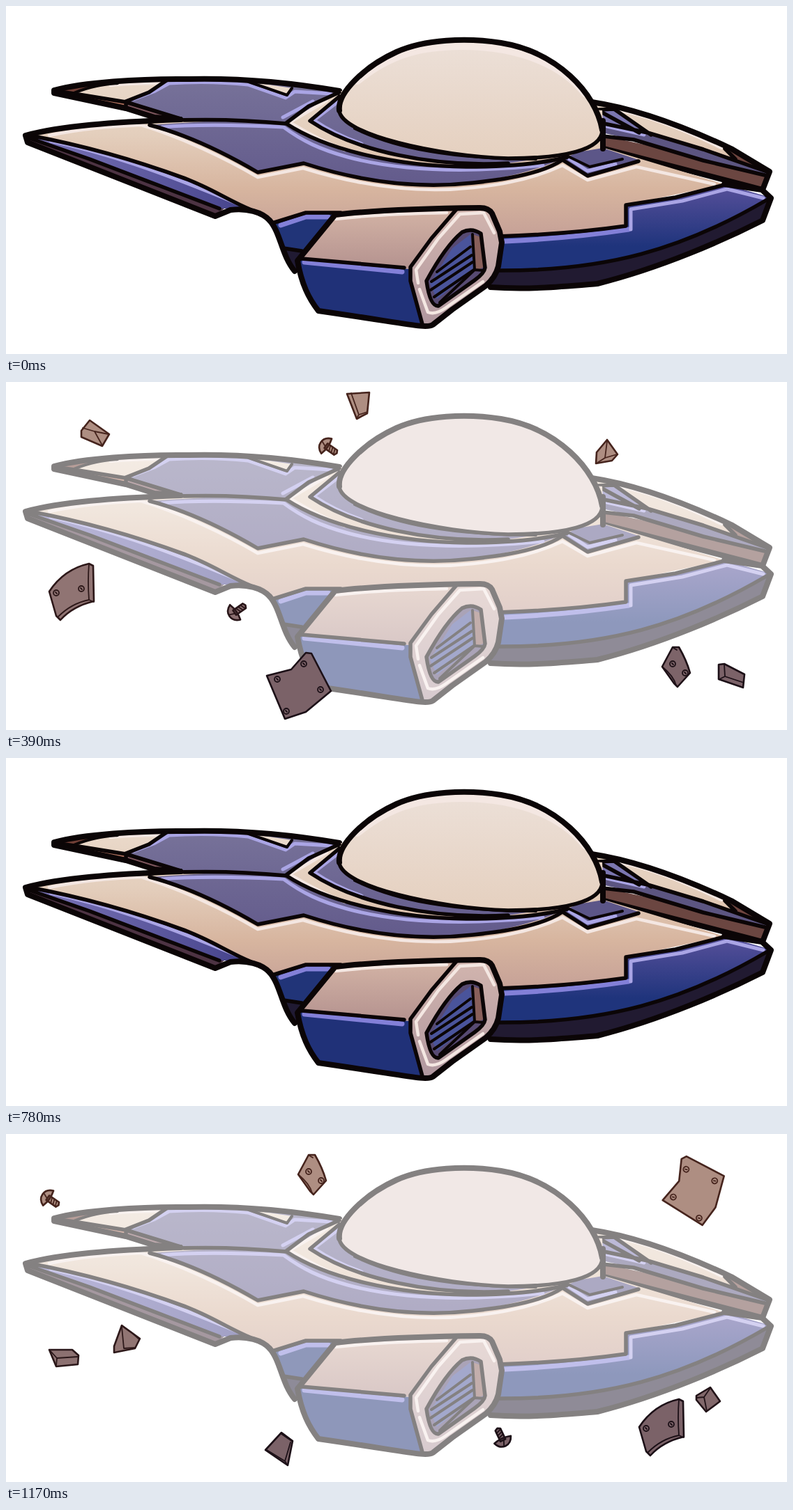
Recreate the animation shown at these times as an HTML page. Size 1120 by 500 pixels, loop 1.56 s.

```html
<!DOCTYPE html>
<html lang="en">
<head>
<meta charset="utf-8">
<title>Damaged spaceship</title>
<style>
html, body { margin: 0; width: 100%; height: 100%; overflow: hidden; background: #fff; }
svg { display: block; }
path { stroke-linejoin: round; stroke-linecap: round; }
.ink path { fill: none; stroke: #0b0506; stroke-width: 5.5; }
.ink .edge { stroke-width: 8; }
.ink .thin { stroke-width: 4; }
.shine path { fill: none; stroke: #f4e7e2; stroke-width: 4.5; }
.lilac path { fill: none; stroke: #aaa5e5; stroke-width: 5; }
.lilac .deep { stroke: #8380d8; stroke-width: 7; }
.hit #ship { opacity: .5; }
.hit #dome { fill: #e4d2ce; }
.hit #domeShine { display: none; }
</style>
</head>
<body>
<svg id="stage" width="1120" height="500" viewBox="0 0 1120 500">
  <defs>
    <linearGradient id="tan" gradientUnits="userSpaceOnUse" x1="0" y1="105" x2="0" y2="330">
      <stop offset="0" stop-color="#ead9ca"/><stop offset=".35" stop-color="#e4cfbd"/>
      <stop offset=".7" stop-color="#d7b59f"/><stop offset="1" stop-color="#c6a197"/>
    </linearGradient>
    <linearGradient id="purple" gradientUnits="userSpaceOnUse" x1="0" y1="105" x2="0" y2="255">
      <stop offset="0" stop-color="#777299"/><stop offset="1" stop-color="#635b8c"/>
    </linearGradient>
    <linearGradient id="blue" gradientUnits="userSpaceOnUse" x1="0" y1="258" x2="0" y2="345">
      <stop offset="0" stop-color="#57509a"/><stop offset="1" stop-color="#1f347c"/>
    </linearGradient>
    <linearGradient id="strip" gradientUnits="userSpaceOnUse" x1="60" y1="0" x2="340" y2="0">
      <stop offset="0" stop-color="#7771b4"/><stop offset="1" stop-color="#46448c"/>
    </linearGradient>
    <linearGradient id="glass" gradientUnits="userSpaceOnUse" x1="0" y1="50" x2="0" y2="220">
      <stop offset="0" stop-color="#ece0d8"/><stop offset="1" stop-color="#e5d0bf"/>
    </linearGradient>
    <linearGradient id="engine" gradientUnits="userSpaceOnUse" x1="0" y1="292" x2="0" y2="378">
      <stop offset="0" stop-color="#d3b3a5"/><stop offset="1" stop-color="#b4928f"/>
    </linearGradient>
    <linearGradient id="nozzle" gradientUnits="userSpaceOnUse" x1="0" y1="290" x2="0" y2="460">
      <stop offset="0" stop-color="#d2b5ae"/><stop offset="1" stop-color="#b0979f"/>
    </linearGradient>
  </defs>

  <g id="ship">
    <!-- far left wing -->
    <path fill="url(#purple)" d="M67 122C110 108 190 104 262 104C350 103 420 112 478 122L402 168L213 160L67 127Z"/>
    <path fill="#b3735f" d="M67 122L98 127L172 139V147L67 127Z"/>
    <path fill="#7d565d" d="M172 139L250 163L213 160L172 147Z"/>
    <path fill="url(#tan)" d="M97 125C140 111 180 109 230 108L205 124L172 137Z"/>
    <path fill="#713f36" d="M74 121C100 114 125 112 148 111L97 125Z"/>
    <path fill="#eadacb" d="M350 109L403 127L410 118Z"/>
    <g class="lilac">
      <path d="M183 134L212 123L234 111C280 108 320 110 347 113L401 132L414 123L466 126"/>
      <path d="M397 160L440 137"/>
    </g>
    <g class="shine"><path d="M150 114C180 111 200 111 219 111"/></g>
    <g class="ink">
      <path d="M70 122L98 126L172 138L250 162M172 137L205 124L230 107M172 138V145"/>
      <path class="thin" d="M348 109L403 128L410 118M97 125C125 114 140 113 160 111M97 126V131"/>
      <path class="edge" d="M478 122C420 112 350 103 262 105C190 104 110 110 69 121V125L172 147L213 160L250 163"/>
    </g>

    <!-- far right wing -->
    <path fill="url(#tan)" d="M838 138C900 144 970 170 1040 204L1095 238L1000 208L840 175Z"/>
    <path fill="#6b4641" d="M850 185L1095 238L1085 263L850 204Z"/>
    <path fill="#5c5581" d="M850 168L920 182L1000 205L1094 238L1088 243L1000 222L900 192L850 181Z"/>
    <path fill="#7b76b0" d="M845 148L872 148L922 184L850 168Z"/>
    <path fill="#70453f" d="M1034 206L1090 236L1046 222Z"/>
    <g class="shine"><path d="M874 149C920 157 975 179 1026 204"/></g>
    <g class="lilac"><path d="M862 173L915 185"/></g>
    <g class="ink">
      <path d="M850 149L872 148L925 185M853 152L908 182M853 168L920 182L1000 206L1094 239M1031 205L1046 220"/>
      <path d="M856 187L900 192L1000 222L1088 243"/>
      <path class="edge" d="M840 138C900 147 970 172 1040 205L1095 238L1085 264L858 205"/>
    </g>

    <!-- hull -->
    <path fill="url(#tan)" d="M28 186C80 172 140 167 200 166L300 164L402 168L478 122L855 150L858 204L1030 256L889 286V316C830 324 770 329 705 331L640 300L475 300L385 312L350 296C230 240 130 204 28 186Z"/>
    <path fill="#4d3343" d="M28 186L32 198L300 302L314 290L40 190Z"/>
    <path fill="url(#strip)" d="M40 187C120 203 190 224 260 250C300 265 320 280 350 291L305 291L36 190Z"/>
    <path fill="url(#purple)" d="M206 171L300 165L402 168C460 204 560 228 660 231C720 230 760 226 800 218C740 247 670 255 600 257C530 255 475 242 427 226L360 239C315 212 260 186 206 171Z"/>
    <path fill="url(#purple)" d="M436 165L478 130L500 173C570 207 660 222 760 220L700 229C590 231 490 202 436 165Z"/>
    <path fill="#bc8c79" d="M835 212L853 205V186L860 190V208Z"/>
    <path fill="#5c5688" d="M798 220L820 210L856 204L907 221L834 243Z"/>
    <g class="shine">
      <path d="M62 186C110 176 150 173 194 171C250 188 315 219 361 246L426 233C510 259 590 270 670 261C730 255 770 242 798 229L834 250L904 231L1016 256"/>
      <path d="M409 166L460 136M410 169C440 187 460 197 486 207"/>
    </g>
    <g class="lilac">
      <path d="M224 174C280 169 340 171 398 174C425 194 450 206 490 217C560 236 650 241 770 229"/>
      <path d="M443 163L478 136M443 165C462 178 482 188 510 198"/>
      <path d="M808 220L834 237L874 227"/>
      <path d="M64 194C140 210 220 237 332 284"/>
    </g>
    <g class="ink">
      <path d="M206 171C260 185 315 212 361 239L427 226C510 253 590 263 670 254C730 248 775 237 798 221L834 244L907 223"/>
      <path d="M250 164C310 162 360 165 402 169C460 207 560 230 660 231C720 231 770 226 805 217"/>
      <path d="M402 168L434 144L478 124M478 130L436 165C500 208 610 232 720 226"/>
      <path class="thin" d="M500 176C560 205 640 220 760 220M806 216L837 231L884 220"/>
      <path d="M34 186C120 202 190 223 260 249C300 265 320 280 352 293M34 190L120 220L230 262L306 291"/>
      <path class="edge" d="M250 163C150 167 80 172 28 186L31 196L300 302L322 293C345 290 367 296 378 308M856 165V205"/>
    </g>

    <!-- nose -->
    <path fill="url(#blue)" d="M889 286L960 274L1030 256L1096 275C970 350 860 381 690 380V331C770 329 840 323 889 316Z"/>
    <path fill="#211a31" d="M690 380C860 381 970 350 1096 275L1085 308C1030 335 940 374 848 399C800 403 750 408 690 404Z"/>
    <g class="lilac">
      <path class="deep" d="M716 338C780 335 840 329 893 321"/>
      <path d="M896 321V292L970 280L1034 263L1086 276"/>
    </g>
    <g class="ink">
      <path d="M705 331C770 329 840 323 889 316V286L960 275L1030 257"/>
      <path d="M705 380C860 381 970 350 1092 278"/>
      <path class="edge" d="M1030 256L1084 264L1097 276L1085 308C1030 336 940 376 848 399C800 403 750 408 695 404"/>
    </g>

    <!-- engine mount -->
    <path fill="#213478" d="M385 312L430 297L480 298L422 356L398 350Z"/>
    <path fill="#201a33" d="M396 348L424 352L418 382L408 376Z"/>
    <g class="lilac"><path class="deep" d="M394 315L430 303L462 303"/></g>
    <g class="ink">
      <path d="M385 311L430 297L480 297M398 348L424 352"/>
      <path class="edge" d="M378 308C394 326 395 358 414 381"/>
    </g>

    <!-- engine -->
    <path fill="url(#engine)" d="M420 364L472 300C520 294 580 291 648 290L578 378Z"/>
    <path fill="#203178" d="M420 364L578 378L608 460L448 438C434 420 424 400 418 375Z"/>
    <path fill="url(#nozzle)" d="M646 291L690 290L706 317L711 340L704 378L690 400L608 460L597 458L579 392L581 374Z"/>
    <path fill="#574a72" d="M603 395Q630 345 654 325Q668 318 681 327L687 376Q686 384 672 394L620 431Q608 432 603 395Z"/>
    <path fill="#89605b" d="M669 328L681 332L685 375L672 382Z"/>
    <path fill="#4a549b" d="M608 399L640 348L666 328L671 380L618 421Z"/>
    <g class="shine">
      <path d="M473 306C525 300 580 298 632 297"/>
      <path d="M591 398L588 379L620 334L651 299L685 297L700 326"/>
      <path d="M593 407L605 440Q616 444 630 434L684 396"/>
    </g>
    <g class="lilac"><path class="deep" d="M428 368L568 382"/></g>
    <g class="ink">
      <path class="thin" d="M618 382L666 346M610 396L668 358M609 408L669 368M614 418L671 379"/>
      <path class="thin" d="M669 328L672 379L685 380M672 379L622 426"/>
      <path d="M603 395Q630 345 654 325Q668 318 681 327L687 376Q686 384 672 394L620 431Q608 432 603 395Z"/>
      <path d="M424 363L571 376M646 292L610 334L580 375L580 395L597 457"/>
      <path class="edge" d="M418 366L472 300C520 294 590 291 680 290Q692 290 697 298L708 324L711 340L706 374Q702 390 688 402L640 436L612 458C603 464 580 457 448 438C434 420 424 400 418 366Z"/>
    </g>

    <!-- dome -->
    <path id="dome" fill="url(#glass)" d="M478 150C475 125 514 87 560 66C600 49 660 45 710 53C790 66 846 125 855 178C855 207 800 219 720 219C620 216 480 185 478 150Z"/>
    <g class="shine" id="domeShine">
      <path style="stroke-width:10" d="M504 108C555 66 600 59 650 58C740 57 800 88 830 126"/>
    </g>
    <g class="ink">
      <path d="M478 150C480 185 620 216 720 219C800 219 855 207 855 178"/>
      <path class="edge" d="M478 150C475 125 514 87 560 66C600 48 660 45 710 53C790 66 846 125 855 178"/>
    </g>
  </g>
  <g id="debris"></g>
</svg>
<script>
const STEP = 390;
const stage = document.getElementById('stage');
const debris = document.getElementById('debris');

const mix = (a, b, k) => `rgb(${a.map((v, i) => Math.round(v + (b[i] - v) * k))})`;

// Pieces get darker and cooler toward the bottom of the stage.
function piece(x, y, turn, body, detail) {
  const k = Math.min(1, Math.max(0, (y - 130) / 290));
  const fill = mix([174, 142, 130], [123, 98, 104], k);
  const line = mix([70, 36, 29], [28, 16, 23], k);
  return `<g transform="translate(${x} ${y}) rotate(${turn})" stroke="${line}" fill="${fill}" stroke-width="2.6">
    <path d="${body}"/><path d="${detail}" fill="none" stroke-width="1.8"/></g>`;
}

const rivet = (x, y) => `M${x - 4} ${y}a4 4 0 1 0 8 0a4 4 0 1 0 -8 0M${x - 1} ${y - 1}l2 2`;

const plate = (x, y, turn) => piece(x, y, turn,
  'M-46 -15L-11 -24L10 -48L18 -47L46 7L10 37L-20 47Z',
  rivet(-31, -10) + rivet(7, -32) + rivet(31, 5) + rivet(-18, 36));

const curvedPlate = (x, y) => piece(x, y, 0,
  'M-32 -1Q-11 -33 25 -41L31 -38L32 13Q2 20 -16 40L-22 34Z',
  'M25 -41Q23 -15 25 11L32 14M25 11Q0 16 -19 35' + rivet(-22, 1) + rivet(14, -5));

const smallPlate = (x, y) => piece(x, y, 0,
  'M-21 0L-6 -28L3 -28Q14 -9 19 9L1 29L-4 24Z',
  'M-21 0Q-4 14 -1 27M-5 -27L0 -24' + rivet(-6, -4) + rivet(12, 9));

const screw = (x, y, turn) => piece(x, y, turn,
  'M1 -4L18 -4L20 0L18 4L1 4ZM2 -13Q6 0 2 13Q-8 9 -8 0Q-8 -9 2 -13Z',
  'M6 -4L9 4M10 -4L13 4M14 -4L17 4M-7 -2L0 1');

const chunk = (x, y, body, detail) => piece(x, y, 0, body, detail);

const bursts = [
  chunk(128, 73, 'M-20 -3L-8 -18L20 2L10 19L-20 6Z', 'M-18 -7L-1 -2L10 18M-1 -2L19 2') +
  chunk(505, 34, 'M-16 -17L16 -19L13 11L-2 19Z', 'M-10 -18L1 13L13 9M-2 18L1 13') +
  chunk(861, 100, 'M1 -17L16 4L8 13L-15 17L-14 1Z', 'M1 -15L-2 9L15 4M-2 9L-13 16') +
  chunk(1040, 422, 'M-18 -16L-10 -17L19 -2L17 17L-18 5Z', 'M-10 -16L-9 1L18 10M-9 1L-17 5') +
  screw(458, 91, 35) + screw(327, 332, -35) +
  curvedPlate(94, 302) + plate(420, 437, 0) + smallPlate(962, 409),

  chunk(83, 322, 'M-21 -12L12 -12L21 -4L20 9L-11 12Z', 'M-20 -11L-10 0L20 -2M-10 0L-11 11') +
  chunk(173, 295, 'M-7 -20L19 -1L12 13L-18 19L-18 10Z', 'M-7 -18L-4 13L12 12M-5 -18L8 -9L18 0') +
  chunk(392, 453, 'M3 -24L19 -12L12 23L-20 1Z', 'M3 -22L19 -11M16 -10L8 17L-18 1M8 17L11 22') +
  chunk(1007, 381, 'M-17 -5L3 -17L17 3L-3 18L-17 1Z', 'M-17 -2L-6 -3L3 -16M-6 -3L-2 17') +
  screw(59, 91, 35) + screw(713, 441, -115) +
  curvedPlate(940, 422) + plate(988, 81, -35) + smallPlate(440, 58)
];

let shown = -1;
function draw(now) {
  const phase = Math.floor(now / STEP) % 4;
  if (phase !== shown) {
    const hit = phase % 2 === 1;
    stage.classList.toggle('hit', hit);
    debris.innerHTML = hit ? bursts[(phase - 1) / 2] : '';
    shown = phase;
  }
  requestAnimationFrame(draw);
}
draw(0);
</script>
</body>
</html>
```
